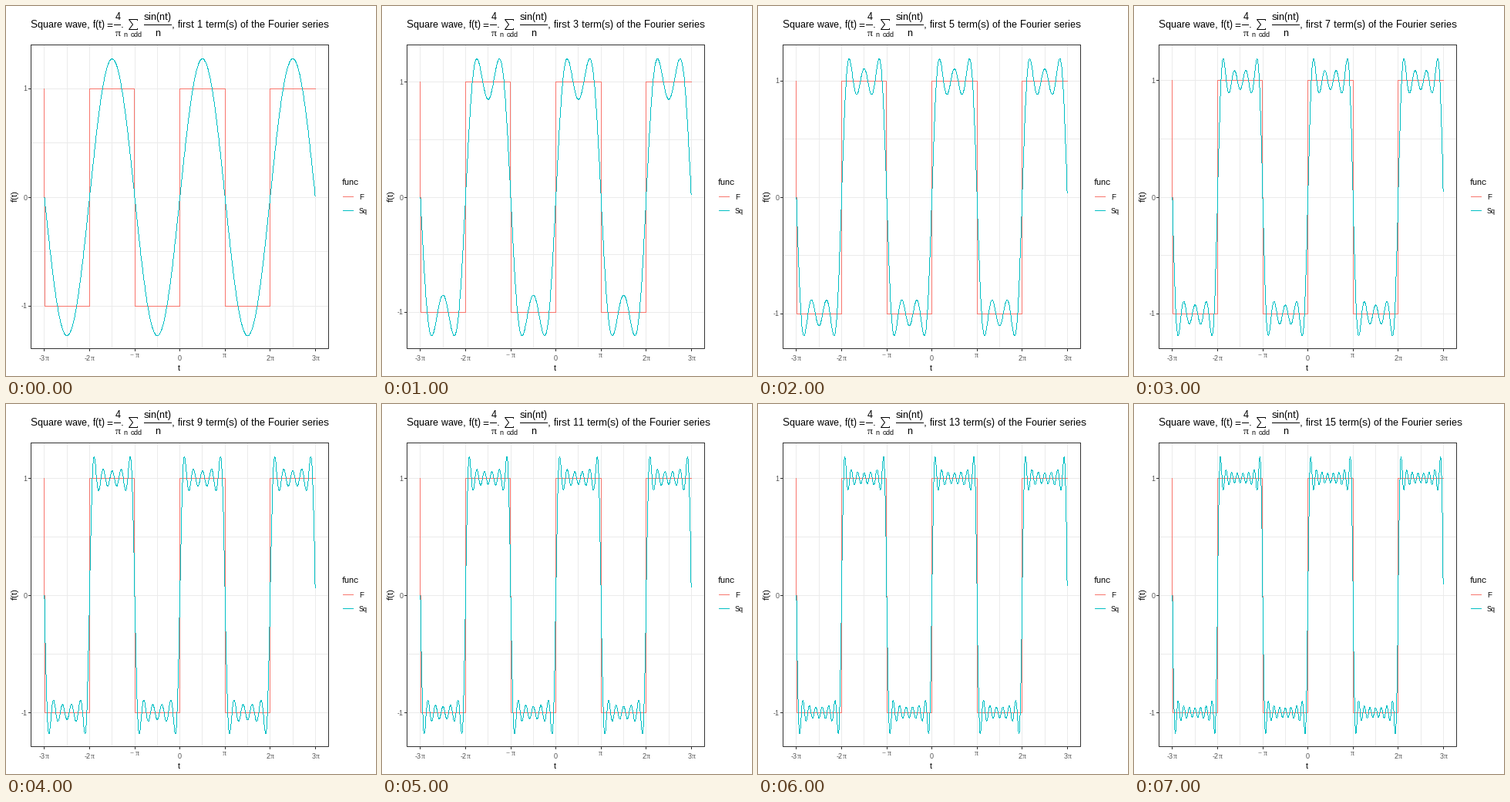
Animation, 480 px wide and 480 px high, one loop 8000 ms. Source, as a matplotlib script:

```python
import numpy as np
import matplotlib.pyplot as plt
from matplotlib.animation import FuncAnimation
from matplotlib.colors import to_rgba

SIZE, DPI = 480, 96
PT = 72 / DPI
RED, TEAL = "#F8766D", "#00BFC4"
GRID, DARK, GREY = "#EBEBEB", "#333333", "#4D4D4D"
SANS, SERIF = "Liberation Sans", "Liberation Serif"
LEFT, RIGHT, TOP, BOTTOM = 32.5, 418.5, 50.5, 444.5
MID_X, HALF_X = 225.1, 193.3
MID_Y, HALF_Y = 247.65, 197.5
PAD = 1.1  # 5% of room on each side of the data
TERMS = range(1, 16, 2)

plt.rcParams.update({"text.hinting": "native", "text.hinting_factor": 1})

fig = plt.figure(figsize=(SIZE / DPI, SIZE / DPI), dpi=DPI, facecolor="white")
ax = fig.add_axes([0, 0, 1, 1])
ax.axis("off")
curves = ax.imshow(np.zeros((SIZE, SIZE, 4)), extent=(0, SIZE, SIZE, 0),
                   aspect="auto", interpolation="nearest", zorder=3)
ax.set_xlim(0, SIZE)
ax.set_ylim(SIZE, 0)

t = np.arange(-3 * np.pi, 3 * np.pi, 0.01)
square = np.sign(np.sin(t))
square[0] = 1


def column(v):
    return np.rint(MID_X + HALF_X * np.asarray(v) / (3 * np.pi * PAD))


def row(v, top):
    return np.rint(MID_Y - HALF_Y * np.asarray(v) / (top * PAD))


def line(x, y, color, z=2, width=1):
    return ax.plot(x, y, color=color, lw=width * PT, zorder=z, snap=False,
                   solid_capstyle="butt", solid_joinstyle="miter")[0]


def text(x, y, s, size, color="black", font=SANS, ha="left", **kw):
    return ax.text(x, y, s, fontsize=size * PT, color=color, family=font,
                   ha=ha, va=kw.pop("va", "baseline"), zorder=6, **kw)


def partial_sum(n):
    return 4 / np.pi * sum(np.sin(k * t) / k for k in range(1, n + 1, 2))


def trace(canvas, x, y, color):
    """Draw a one-pixel polyline without smoothing."""
    steps = np.maximum(abs(np.diff(x)), abs(np.diff(y)))
    length = np.concatenate(([0], np.cumsum(steps)))
    at = np.arange(length[-1] + 1)
    cols, lines = (np.rint(np.interp(at, length, v)).astype(int) for v in (x, y))
    canvas[lines, cols] = to_rgba(color)


# Vertical grid and x axis
for k in range(-6, 7):
    x = column(k * np.pi / 2) + 0.5
    line([x, x], [TOP, BOTTOM], GRID, 1)
    if k % 2 == 0:
        line([x, x], [BOTTOM + 0.5, BOTTOM + 3.5], DARK)

for x, digits in ((43, "-3"), (102, "-2"), (338, "2"), (397, "3")):
    text(x, 460, digits, 9, GREY)
    text(x + 5 + 3 * (len(digits) - 1), 460, "π", 9, GREY, SERIF)
text(225.5, 460, "0", 9, GREY, ha="center")
text(161, 456, "−", 9, GREY, SERIF)
text(168, 456, "π", 9, GREY, SERIF)
text(281, 456, "π", 9, GREY, SERIF)

# Horizontal grid and y axis, placed per frame
rows = {}
for v in (-1, -0.5, 0, 0.5, 1):
    rows[v] = [line([LEFT, RIGHT], [0, 0], GRID, 1)]
    if v == int(v):
        rows[v] += [line([LEFT - 3.5, LEFT - 0.5], [0, 0], DARK),
                    text(27.5, 0, str(int(v)), 9, GREY, ha="right")]

line([LEFT, RIGHT, RIGHT, LEFT, LEFT, RIGHT],
     [TOP, TOP, BOTTOM, BOTTOM, TOP, TOP], DARK, 5)

text(224.5, 473, "t", 11, ha="center")
text(12, 247, "f(t)", 11, ha="center", va="center", rotation=90)

# Legend
text(436, 232, "func", 11)
for y, color, name in ((247.5, RED, "F"), (265.5, TEAL, "Sq")):
    line([437, 451], [y, y], color)
    text(458, y + 3.5, name, 9)

# Title with its formula
text(32, 28, "Square wave, f(t)", 13)
text(130, 28, "=", 13)
text(145.5, 18, "4", 13, ha="center")
text(145, 39, "π", 13, font=SERIF, ha="center")
line([140, 149], [24.5, 24.5], "black")
text(148.5, 28, ".", 13)
line([170.5, 170.5, 159.5, 164.5, 159.5, 170.5, 170.5],
     [19, 17.5, 17.5, 24, 30.5, 30.5, 29], "black")
text(152, 40, "n", 9)
text(162, 40, "odd", 9)
text(179, 18, "sin(nt)", 13)
line([179, 215], [24.5, 24.5], "black")
text(197, 39, "n", 13, ha="center")
tail = text(215, 28, "", 13)


def draw(i):
    n = TERMS[i]
    wave = partial_sum(n)
    top = np.abs(wave).max()
    canvas = np.zeros((SIZE, SIZE, 4))
    trace(canvas, column(t), row(square, top), RED)
    trace(canvas, column(t), row(wave, top), TEAL)
    curves.set_data(canvas)
    for v, (grid, *axis) in rows.items():
        y = row(v, top) + 0.5
        grid.set_ydata([y, y])
        if axis:
            axis[0].set_ydata([y, y])
            axis[1].set_y(y + 3)
    tail.set_text(f", first {n} term(s) of the Fourier series")
    return []


anim = FuncAnimation(fig, draw, frames=len(TERMS), interval=1000,
                     repeat=True, repeat_delay=0, blit=False)
plt.show()
```
